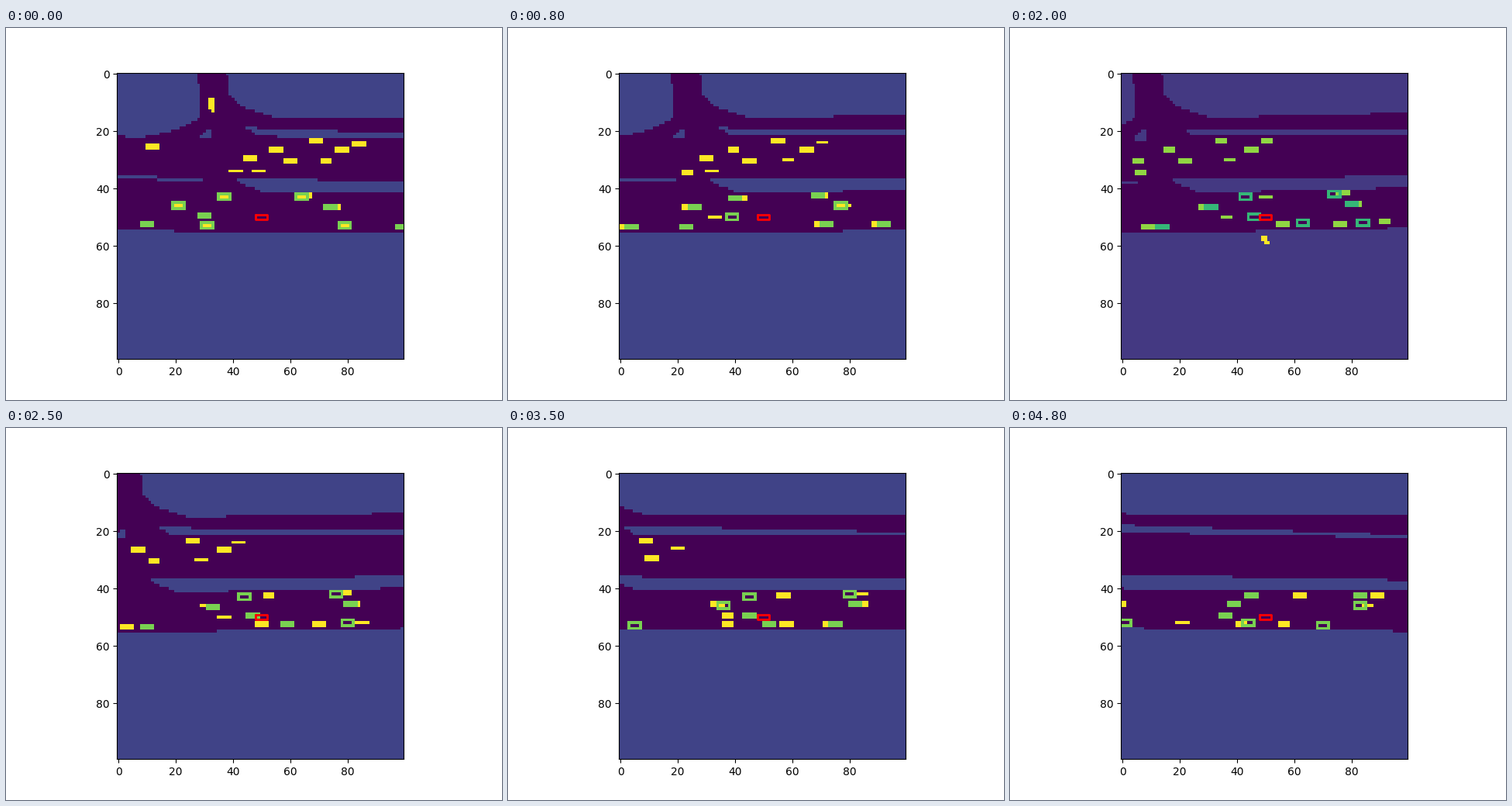
Animation of 640x480 px, one loop 4.9 s. Source, as a matplotlib script:

```python
import numpy as np
import matplotlib.pyplot as plt
from matplotlib.animation import FuncAnimation

N = 100
FRAMES = 49
LAST = FRAMES - 1
SPEED = 1.22  # cells the ground slides left per frame
WALL, BOX, CAR, WALKER = 1, 4, 5, 6

row, col = np.mgrid[0:N, 0:N]

# Road edges: row at the middle column, slope along the ground
EDGES = {
    "top": (15.95, -.004),
    "isle_top": (19.55, .025),
    "isle_low": (22.4, .008),
    "band_top": (37.15, .007),
    "band_low": (41.95, -.003),
    "low": (55.84, 0),
}

# Junction corners, measured from the left kerb of the side road
left_kerb = -19 * (np.maximum(0, row - 12) / 10) ** 2.5 - (row < 4)
right_kerb = 9 + 16 * (row / 15) ** 4
isle_start = 16 + 1.5 * np.maximum(0, row - 19)
band_start = 13 + np.maximum(0, row - 37) ** 1.5

# Oncoming traffic: start column, speed, lane row, last frame
ONCOMING = [
    (12, -2.4, 26.25, LAST),
    (41, -2.2, 34, LAST),
    (46, -2.02, 29.55, LAST),
    (49, -2.12, 34, LAST),
    (55, -1.93, 26.25, LAST),
    (60, -1.9, 30.4, LAST),
    (69, -1.72, 23.6, LAST),
    (72.5, -1.75, 30, LAST),
    (78, -1.65, 26.5, 38),
    (84, -1.68, 24.1, 27),
]

# Near traffic: column at the start, middle and end of the loop, lane row
NEAR_CARS = [
    (21, 30, 39, 46.17),
    (37, 52, 62, 43.15),
    (65, 79, 89, 42.65),
    (30, 37, 36, 50.03),
    (10, -20, -60, 53),
    (31, 4, -28, 53.1),
    (75, 82, 85.5, 46.2),
    (79, 51, 21, 52.87),
    (99, 71, 41.5, 53.1),
    (116, 86.5, 56.5, 52.95),
    (-20, -7, -1, 46.3),
]
OUTLINES = [
    (21, 33, 39, 46.35),
    (37, 44, 45, 43.25),
    (64, 76, 83, 42.7),
    (30, 46.5, 36, 49.95),
    (10, -9, -30, 53.1),
    (31, 11, 1, 53.1),
    (74, 80.5, 83, 46.2),
    (79, 60, 44, 52.76),
    (99, 81, 70, 53.03),
]


def near(v):
    return np.floor(np.asarray(v) + 0.5).astype(int)


def span(first, last):
    return slice(max(0, int(first)), max(0, int(last) + 1))


def tilt(f):
    return np.interp(f, [0, 13, 20, 48], [.011, -.0215, -.0215, .0115])


def lift(f):
    u = min(1, f / 40)
    return -0.85 * u * u * (3 - 2 * u)


def glide(f, start, mid, end):
    """Parabola through three evenly timed positions."""
    u = f / LAST
    return (start + (4 * mid - 3 * start - end) * u
            + 2 * (start - 2 * mid + end) * u * u)


def lane_row(f, x, lane):
    return lane + 0.6 * lift(f) + tilt(f) * (x - 50)


def edge(f, name, shift=0):
    mid, slope = EDGES[name]
    x = col - 50
    return near(mid + shift + lift(f) + tilt(f) * x + slope * (x + SPEED * f))


def road(f):
    x = col - near(29 - SPEED * f)
    low = edge(f, "isle_low")
    verge = edge(f, "isle_low", 1)
    band = edge(f, "band_top")
    wall = (x < left_kerb) & (row < np.minimum(23, verge))
    wall |= (x >= right_kerb) & (row < edge(f, "top"))
    wall |= (x >= isle_start) & (row >= edge(f, "isle_top")) & (row < low)
    wall |= (x >= np.maximum(0, 22 - row)) & (x < 4) & (row >= 20) & (row < verge)
    wall |= (x < 1) & (row == band)
    wall |= (x >= band_start) & (row >= band) & (row < edge(f, "band_low"))
    wall |= row >= edge(f, "low")
    return wall * WALL


def draw_car(grid, f, x, lane):
    y = lane_row(f, x, lane)
    grid[span(near(y - .35), near(y + .35)),
         span(near(x - 1.85), near(x + 1.85))] = CAR


def draw_outline(grid, under, f, x, lane):
    y = lane_row(f, x, lane)
    x, r0, r1 = near(x), near(y - .75), near(y + .75)
    grid[span(r0, r1), span(x - 2, x + 2)] = BOX
    inner = span(r0 + 1, r1 - 1), span(x - 1, x + 1)
    grid[inner] = under[inner]


def draw_turning_car(grid, f):
    y, x = near(9 + 0.75 * f), near(32 - 1.25 * f)
    grid[span(y, y + 3 - 0.5 * f), x] = CAR
    grid[span(y, y + 4), x + 1] = CAR


def draw_walker(grid, f):
    y, x = near(57 - 0.5 * (f - 20)), near(49 - 1.2 * (f - 20))
    grid[y:y + 2, x:x + 2] = WALKER
    grid[y + 2, x + 1:x + 3] = WALKER


def scene(f):
    grid = road(f)
    for start, speed, lane, last in ONCOMING:
        if f <= last:
            draw_car(grid, f, start + speed * f, lane)
    for *path, lane in NEAR_CARS:
        draw_car(grid, f, glide(f, *path), lane)
    if f < 7:
        draw_turning_car(grid, f)
    if 16 <= f <= 22:
        draw_walker(grid, f)
    under = grid.copy()
    for *path, lane in OUTLINES:
        draw_outline(grid, under, f, glide(f, *path), lane)
    return grid


fig, ax = plt.subplots(figsize=(6.4, 4.8), dpi=100)
image = ax.imshow(scene(0), cmap="viridis", interpolation="nearest")
ax.plot([48, 52, 52, 48, 48], [49, 49, 50.75, 50.75, 49], color="red", lw=2,
        solid_capstyle="round")
ax.set_xlim(-0.5, N - 0.5)
ax.set_ylim(N - 0.5, -0.5)
ax.set_xticks(range(0, N, 20))
ax.set_yticks(range(0, N, 20))


def update(f):
    grid = scene(f)
    image.set_data(grid)
    image.set_clim(0, grid.max())
    return [image]


anim = FuncAnimation(fig, update, frames=FRAMES, interval=100, repeat=True)
plt.show()
```
